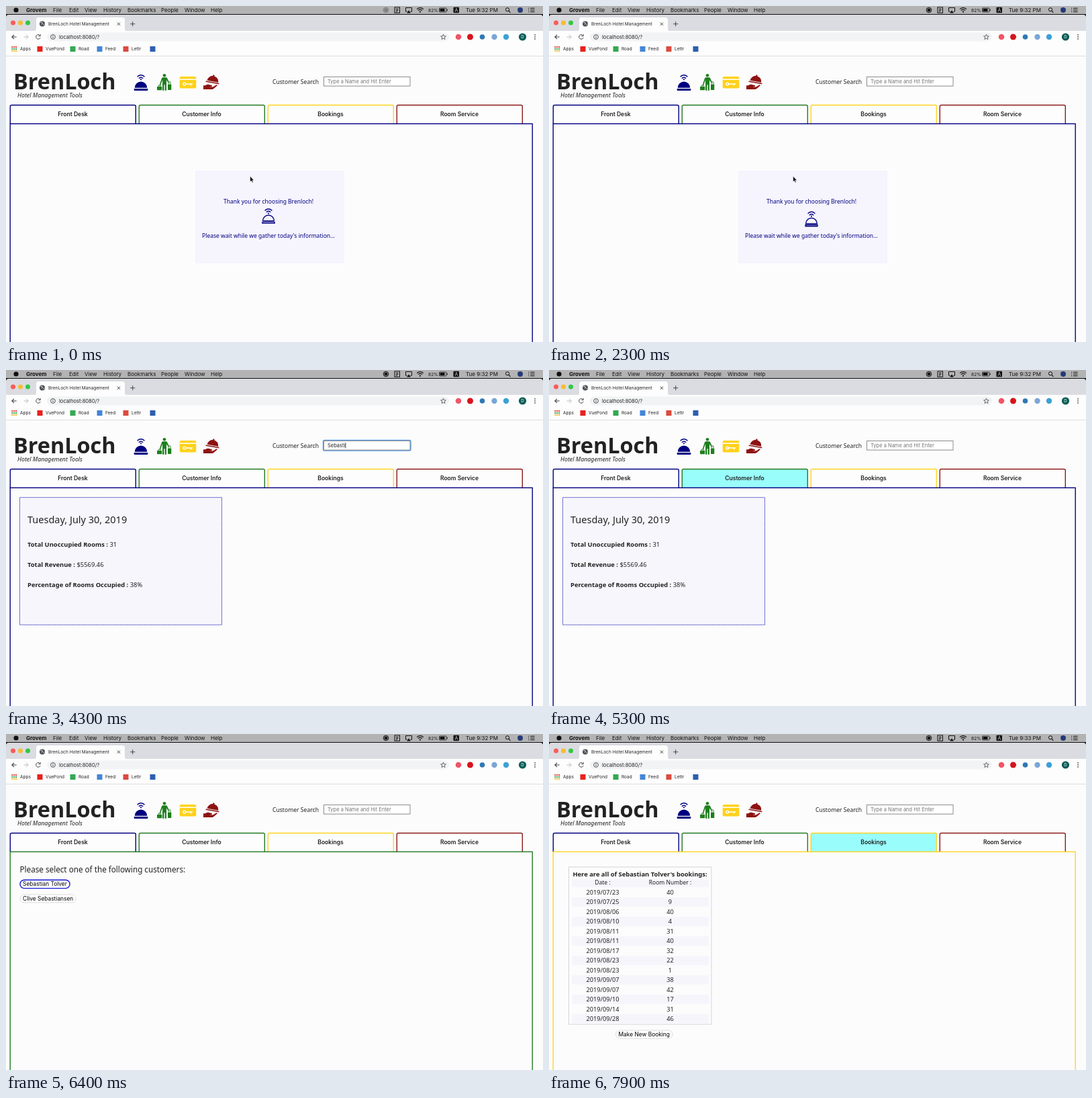
These frames come from a looping animation (800x500 px, 8000 ms). An HTML page:

```html
<!DOCTYPE html>
<html lang="en">
<head>
<meta charset="utf-8">
<title>Hotel Management</title>
<style>
  html, body { margin: 0; width: 100%; height: 100%; overflow: hidden; background: #fcfcfc; }
  svg { display: block; width: 800px; height: 500px; font: 8.5px "Noto Sans", sans-serif; fill: #222; }
  .ui { font-family: Inter, sans-serif; }
  .line { fill: none; stroke: #444; }
  .mid { text-anchor: middle; }
  .navy { fill: navy; }
  .bold { font-weight: 700; }
</style>
</head>
<body>
<svg viewBox="0 0 800 500">
  <defs>
    <g id="wave">
      <path d="M-5-4.4Q0-8.8 5-4.4M-2.8-1.9Q0-4.4 2.8-1.9" fill="none" stroke="navy" stroke-width="1.4" stroke-linecap="round"/>
      <circle r="1.1" class="navy"/>
    </g>
  </defs>

  <!-- menu bar -->
  <rect width="800" height="12" fill="#b3b3b3"/>
  <g id="menu" class="ui" font-size="8" fill="#111">
    <circle cx="15" cy="6" r="3.6"/>
    <text x="30" y="9" class="bold">Grovem</text>
  </g>
  <g id="record"><circle cx="566" cy="6" r="3.8" class="line" style="stroke:inherit"/><rect x="564.2" y="4.2" width="3.6" height="3.6"/></g>
  <g class="line" style="stroke:#111">
    <rect x="579" y="2" width="7.5" height="8.2"/><path d="M581 4.5h3.5M581 6.5h3.5M581 8.3h2"/>
    <path d="M597.5 8.2H595.5V2.5H604.5V8.2H602.5"/>
    <path d="M612 4.6Q617 .6 622 4.6M613.8 6.6Q617 4 620.2 6.6" stroke-width="1.2"/>
    <rect x="645.5" y="3" width="10.5" height="6" rx="1" stroke-width=".8"/>
    <circle cx="747" cy="5.3" r="2.6"/><path d="M749 7.3l2.4 2.5" stroke-width="1.2"/>
    <path d="M778 3.3h1.2M781 3.3h6.5M778 6h1.2M781 6h6.5M778 8.7h1.2M781 8.7h6.5"/>
  </g>
  <path d="M597 10.5l3-4 3 4zM646.5 4h7v4h-7zM656.7 4.7h1v2.6h-1z" fill="#111"/>
  <circle cx="617" cy="8.7" r="1.1" fill="#111"/>
  <rect x="666.5" y="1.8" width="8.5" height="8.5" rx="1" fill="#111"/>
  <text x="670.8" y="8.7" class="ui mid" font-size="7" style="fill:#ccc">A</text>
  <text x="629" y="8.5" class="ui" font-size="6.7" fill="#111">82%</text>
  <text id="clock" x="685" y="9" class="ui" font-size="8" fill="#111"></text>
  <circle cx="766" cy="6" r="4" fill="#263a78"/>

  <!-- browser -->
  <rect y="12" width="800" height="8" fill="#111"/>
  <path d="M0 37.5V17q0-4 4-4H796q4 0 4 4V37.5z" fill="#dadce1"/>
  <path d="M41 37.5q4 0 4-4V21q0-4 4-4H173q4 0 4 4V33.5q0 4 4 4z" fill="#fdfdfd"/>
  <rect y="37" width="800" height="37" fill="#fdfdfd"/>
  <rect x="61" y="39.5" width="599" height="13" rx="6.5" fill="#f1f3f4"/>
  <path d="M0 74.5H800" stroke="#ddd"/>
  <circle cx="10.5" cy="25" r="3.5" fill="#fc5b57"/>
  <circle cx="21.5" cy="25" r="3.5" fill="#f8bc30"/>
  <circle cx="32.5" cy="25" r="3.5" fill="#33c748"/>
  <circle cx="54" cy="26.5" r="4" fill="#4b4f54"/>
  <path d="M51.3 25q2-2 3 0t-1.5 2.2M55.5 28.5l1.8-2" fill="none" stroke="#eee" stroke-width=".9"/>
  <text x="63" y="29" class="ui" font-size="6.6">BrenLoch Hotel Management</text>
  <g class="line">
    <path d="M165.8 24.6l4.2 4.2M170 24.6l-4.2 4.2M185.2 26.7h7M188.7 23.2v7"/>
    <path d="M15.7 46H9M12 42.8L8.8 46l3.2 3.2" stroke-width="1.1"/>
    <path d="M26.5 46h6.7M30 42.8l3.2 3.2-3.2 3.2" stroke="#bbb"/>
    <path d="M50.5 43.8A3.3 3.3 0 1 0 51.1 47M51.2 42v2.7h-2.7"/>
    <circle cx="70" cy="46" r="3.4" stroke-width=".9"/><path d="M70 45.6v2.2M70 43.8v1"/>
    <path d="M651.5 42.2l1.1 2.6 2.8.2-2.1 1.8.6 2.8-2.4-1.5-2.4 1.5.6-2.8-2.1-1.8 2.8-.2z" stroke-width=".8"/>
  </g>
  <text x="79" y="48.8" class="ui" font-size="7.6">localhost:8080/?</text>
  <circle cx="674" cy="46" r="4.3" fill="#ef5667"/>
  <circle cx="691.5" cy="46" r="4.5" fill="#d8141c"/>
  <circle cx="709.5" cy="46" r="3.8" fill="#2f78b5"/>
  <circle cx="727.5" cy="46" r="4.2" fill="#7ba6d6"/>
  <circle cx="745" cy="46" r="4.2" fill="#3ba0d8"/>
  <circle cx="769.5" cy="46" r="5.6" fill="#0b5d57"/>
  <text x="769.5" y="48.3" class="ui mid" font-size="6" style="fill:#fff">D</text>
  <path d="M787.2 42.2h1.6v1.6h-1.6zM787.2 45.2h1.6v1.6h-1.6zM787.2 48.2h1.6v1.6h-1.6z" fill="#444"/>
  <g id="bookmarks" class="ui" font-size="6.5"></g>

  <!-- page header -->
  <text x="11" y="124.3" font-size="32.4" class="bold">BrenLoch</text>
  <text x="17" y="136.3" font-size="8.8" font-style="italic">Hotel Management Tools</text>
  <use href="#wave" x="201" y="109.3"/>
  <path d="M191.7 121.8a9.3 9.3 0 0 1 18.6 0zM190.7 123h20.6v1.7q0 1.2-1.2 1.2h-18.2q-1.2 0-1.2-1.2z" class="navy"/>
  <g fill="#1e7f1e">
    <circle cx="236" cy="103.3" r="2.3"/>
    <path d="M233.6 106.3h4.8q1.3 0 1.8 1.3l2.6 5.4-1.3.9-2.5-3.6v15.5h-2.2v-8.5h-1.4v8.5h-2.3V110l-3 8.3-1.5-.5 3.3-10q.5-1.5 1.7-1.5z"/>
    <rect x="225" y="119.8" width="7.2" height="5.5" rx=".8"/>
    <rect x="241" y="116.5" width="5.3" height="8.5" rx=".8"/>
    <path d="M227 119.5v-1.3h3.2v1.3M242.3 116.5v-3.5h2.7v3.5" fill="none" stroke="#1e7f1e" stroke-width=".9"/>
  </g>
  <rect x="258.7" y="105" width="24.6" height="17.6" rx="2" fill="#ffd21c"/>
  <path d="M258.7 109.3h24.6M267 116h11M275.5 116v2.5" stroke="#fff" stroke-width="1.5"/>
  <circle cx="265.8" cy="116" r="1.9" fill="none" stroke="#fff" stroke-width="1.4"/>
  <g fill="#8e1212">
    <g transform="rotate(10 308 112)">
      <path d="M299.6 112.3a8.4 8.2 0 0 1 16.8 0z"/><circle cx="308" cy="103.6" r="1.3"/>
      <rect x="297.7" y="113.2" width="20.3" height="1.6" rx=".8"/>
    </g>
    <path d="M294 118.3h2.8q2.2-2.1 4.6-1.5l5 1.2q1.3.6.4 1.8l-3.6.4 5 .2 5-3q1.6-.3 1.5 1l-5 4.3q-1.3 1.2-3.2 1.2H294z"/>
  </g>
  <text x="397" y="115.6" font-size="8.6">Customer Search</text>
  <rect id="ring" x="473" y="105" width="129.5" height="14.5" rx="1.5" fill="none" stroke="#5c9ded" stroke-width="2.4"/>
  <rect id="field" x="473.5" y="105.5" width="128.5" height="13.6" fill="#fff" stroke="#8c8c8c"/>
  <text id="query" x="479" y="115.3" class="ui" font-size="7.5"></text>
  <path id="caret" d="M0 108v8.5" stroke="#222" stroke-width=".8"/>
  <g id="tabs" class="ui mid" font-size="8.55" font-weight="600"></g>
  <rect id="frame" x="6.2" y="175.3" width="778" height="400" fill="#fcfcfc" stroke-width="1.4"/>

  <!-- scenes -->
  <g class="scene mid navy">
    <rect x="282" y="245" width="222" height="138" fill="#f6f4fd"/>
    <text x="391" y="293.8">Thank you for choosing Brenloch!</text>
    <g id="bell">
      <use href="#wave" y="7.5"/>
      <path d="M-8.4 18.6a8.4 8.4 0 0 1 16.8 0zM-9 20.4H9v2H-9z" fill="none" stroke="navy" stroke-width="1.4" stroke-linejoin="round"/>
    </g>
    <text x="391" y="345">Please wait while we gather today's information...</text>
  </g>
  <g class="scene" font-size="9.4">
    <rect x="20.5" y="189.7" width="301" height="189.5" fill="#f7f6fd" stroke="#3030b4" stroke-dasharray="1.2 .6"/>
    <text x="32" y="228.4" font-size="14.5">Tuesday, July 30, 2019</text>
    <text x="32" y="262.5"><tspan class="bold">Total Unoccupied Rooms :</tspan> 31</text>
    <text x="32" y="292.5"><tspan class="bold">Total Revenue :</tspan> $5569.46</text>
    <text x="32" y="322.5"><tspan class="bold">Percentage of Rooms Occupied :</tspan> 38%</text>
  </g>
  <g class="scene">
    <g id="list">
      <text x="20.5" y="206" font-size="11.7">Please select one of the following customers:</text>
      <g class="ui mid" font-size="8.4" fill="#000" stroke-width=".8">
        <rect id="choice" x="21" y="217.2" width="74" height="12.4" rx="6" fill="#fff"/>
        <text x="58" y="226.3">Sebastian Tolver</text>
        <rect x="21" y="238.8" width="83.5" height="12" rx="6" fill="#fff" stroke="#d4d4d4"/>
        <text x="62.7" y="247.8">Clive Sebastiansen</text>
      </g>
    </g>
  </g>
  <g class="scene mid">
    <rect x="29.5" y="198" width="212.5" height="234" fill="#fcfcfd" stroke="#d6d6da"/>
    <g id="bookings" font-size="9.2"></g>
    <text x="135.5" y="212" font-size="9.4" class="bold">Here are all of Sebastian Tolver's bookings:</text>
    <text x="80" y="224.3">Date :</text><text x="180.5" y="224.3">Room Number :</text>
    <rect x="99.5" y="441" width="84.5" height="12" rx="6" fill="#fff" stroke="#d4d4d4" stroke-width=".8"/>
    <text x="141.7" y="450.1" class="ui" font-size="8.4" fill="#000">Make New Booking</text>
  </g>

  <path id="arrow" d="M0 0v8.3l1.9-1.7 1.4 3 1.3-.6-1.3-2.9h2.6z" fill="#111" stroke="#fff" stroke-width=".5"/>
  <path id="beam" d="M492.6 106.5q1.4 0 1.4 1v7q0 1-1.4 1M495.4 106.5q-1.4 0-1.4 1v7q0 1 1.4 1M493 111.5h2" fill="none" stroke="#222" stroke-width=".8"/>
</svg>
<script>
const $ = id => document.getElementById(id);
const add = (id, markup) => $(id).insertAdjacentHTML('beforeend', markup);
const show = (el, on) => el.style.display = on ? '' : 'none';
const colors = ['#000080', '#247a24', '#ffd426', '#8b1a1a'];
const scenes = document.querySelectorAll('.scene');

Object.entries({ File: 70, Edit: 94, View: 117, History: 145, Bookmarks: 181, People: 231, Window: 266, Help: 305 })
  .forEach(([label, x]) => add('menu', `<text x="${x}" y="9">${label}</text>`));

for (let i = 0; i < 9; i++)
  add('bookmarks', `<rect x="${8.3 + i % 3 * 2.9}" y="${60 + (i / 3 | 0) * 2.9}" width="2" height="2"
    fill="${['#e5443a', '#33a457', '#f2b51d'][i / 3 | 0]}"/>`);
[['Apps', 21], ['VuePond', 59, '#e8211d'], ['Road', 108, '#34a853'], ['Feed', 148, '#4285d8'],
 ['Lettr', 187, '#db4a3f'], ['', 227, '#2d5fae']].forEach(([label, x, color]) =>
  add('bookmarks', `${color ? `<rect x="${x - 12.5}" y="60" width="8" height="8" fill="${color}"/>` : ''}
    <text x="${x}" y="66.3">${label}</text>`));

['Front Desk', 'Customer Info', 'Bookings', 'Room Service'].forEach((label, i) =>
  add('tabs', `<g transform="translate(${5.8 + i * 192})">
    <path d="M.5 175.5V149.5q0-2 2-2H185.5q2 0 2 2V175.5" stroke="${colors[i]}" stroke-width="1.4"/>
    <text x="93.7" y="164.4">${label}</text></g>`));
const tabs = document.querySelectorAll('#tabs path');

add('bookings', '<rect x="34" y="216" width="204" height="12" fill="#f6f5fc"/>');
`07/23 40,07/25 9,08/06 40,08/10 4,08/11 31,08/11 40,08/17 32,08/23 22,08/23 1,09/07 38,09/07 42,09/10 17,09/14 31,09/28 46`
  .split(',').forEach((row, i) => {
    const [date, room] = row.split(' '), y = 235.7 + i * 14.46;
    if (i % 2) add('bookings', `<rect x="34" y="${y - 7}" width="204" height="13.8" fill="#f6f5fc"/>`);
    add('bookings', `<text x="80" y="${y + 3.3}">2019/${date}</text><text x="180.5" y="${y + 3.3}">${room}</text>`);
  });

const keyTimes = [3600, 3700, 3900, 4000, 4100, 4200, 4300, 4600, 4700];

function draw(t) {
  const scene = t < 2800 ? 0 : t < 5500 ? 1 : t < 7400 ? 2 : 3;
  scenes.forEach((el, i) => show(el, i === scene));
  $('frame').setAttribute('stroke', colors[Math.max(0, scene - 1)]);
  $('bell').setAttribute('transform', `translate(391 ${304.3 - 3.3 * Math.cos(t * Math.PI / 500)})`);

  $('record').style.cssText = t < 300 ? 'fill:#777;stroke:#777' : 'fill:#111;stroke:#111';
  $('clock').textContent = t < 7100 ? 'Tue 9:32 PM' : 'Tue 9:33 PM';

  const typed = t < 4900 ? 'Sebastian'.slice(0, keyTimes.filter(k => k <= t).length) : '';
  const focus = t >= 3200 && t < 5100;
  $('query').textContent = typed || 'Type a Name and Hit Enter';
  $('query').style.fill = typed ? '#222' : '#757575';
  show($('ring'), focus);
  show($('caret'), focus);
  $('caret').setAttribute('transform', `translate(${479.6 + (typed ? $('query').getComputedTextLength() : 0)})`);

  const hover = t >= 5200 && t < 6200 || t >= 7000 && t < 7200 ? 1 : t >= 7200 ? 2 : -1;
  tabs.forEach((tab, i) => tab.setAttribute('fill', i === hover ? '#99fdfb' : '#fdfdfd'));

  show($('list'), t < 6700);
  $('choice').setAttribute('stroke', t >= 6400 ? '#1a1ad6' : '#d4d4d4');
  $('choice').setAttribute('stroke-width', t >= 6400 ? 1.4 : .8);

  const p = Math.min(1, Math.max(0, (t - 2750) / 400)), e = p * p * (3 - 2 * p);
  $('arrow').setAttribute('transform', `translate(${363.6 + 130.4 * e} ${253.3 - 145 * e})`);
  show($('arrow'), p < 1);
  show($('beam'), p === 1 && t < 3600);
}

function tick() {
  draw(performance.now() % 8000);
  requestAnimationFrame(tick);
}
tick();
</script>
</body>
</html>
```
